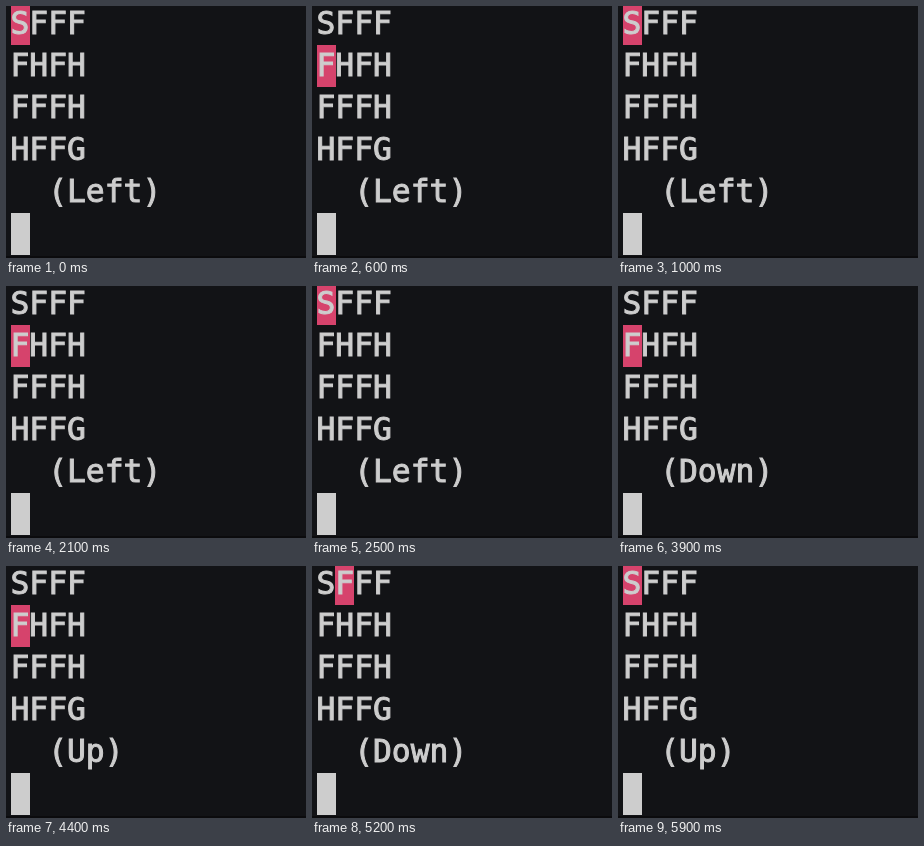
Recreate the animation shown at these times as an HTML page with a canvas. Size 300 by 252 pixels, loop 6000 ms.

```html
<!DOCTYPE html>
<html lang="en">
<head>
<meta charset="utf-8">
<title>Grid walk</title>
<style>
  html, body { margin: 0; width: 100%; height: 100%; overflow: hidden; background: #121316; }
  canvas { display: block; }
</style>
</head>
<body>
<canvas id="stage" width="300" height="252"></canvas>
<script>
const ctx = document.getElementById("stage").getContext("2d");
const LOOP = 6000;
const LEFT = 4.5, TOP = -3, CELL_W = 18.84, CELL_H = 42, BASELINE = 31;
const INK = "#cdcdcd", PINK = "#d6436c", BACK = "#121316", EDGE = "#0b0b0d";
const GRID = ["SFFF", "FHFH", "FFFH", "HFFG"];

// Each step: start time, agent row, agent column, last action
const STEPS = [
  [0, 0, 0, "Left"],
  [500, 1, 0, "Left"],
  [900, 0, 0, "Left"],
  [1800, 1, 0, "Left"],
  [2200, 0, 0, "Left"],
  [3100, 1, 0, "Down"],
  [4400, 1, 0, "Up"],
  [4800, 0, 0, "Left"],
  [5200, 0, 1, "Down"],
  [5600, 0, 0, "Up"],
];

function fillCell(row, col, color) {
  ctx.fillStyle = color;
  ctx.fillRect(Math.round(LEFT + col * CELL_W), TOP + row * CELL_H, 19, CELL_H);
}

function print(text, row) {
  const y = TOP + row * CELL_H + BASELINE;
  ctx.fillStyle = ctx.strokeStyle = INK;
  ctx.fillText(text, LEFT, y);
  ctx.strokeText(text, LEFT, y);
}

function draw(time) {
  const [, row, col, action] = STEPS.findLast(([start]) => start <= time);
  ctx.fillStyle = BACK;
  ctx.fillRect(0, 0, 300, 252);
  ctx.fillStyle = EDGE;
  ctx.fillRect(0, 250, 300, 2);
  ctx.font = '31.3px "DejaVu Sans Mono", monospace';
  ctx.lineWidth = 1;
  fillCell(row, col, PINK);
  GRID.forEach(print);
  print(`  (${action})`, 4);
  fillCell(5, 0, INK);
}

function tick() {
  draw(performance.now() % LOOP);
  requestAnimationFrame(tick);
}
tick();
</script>
</body>
</html>
```
